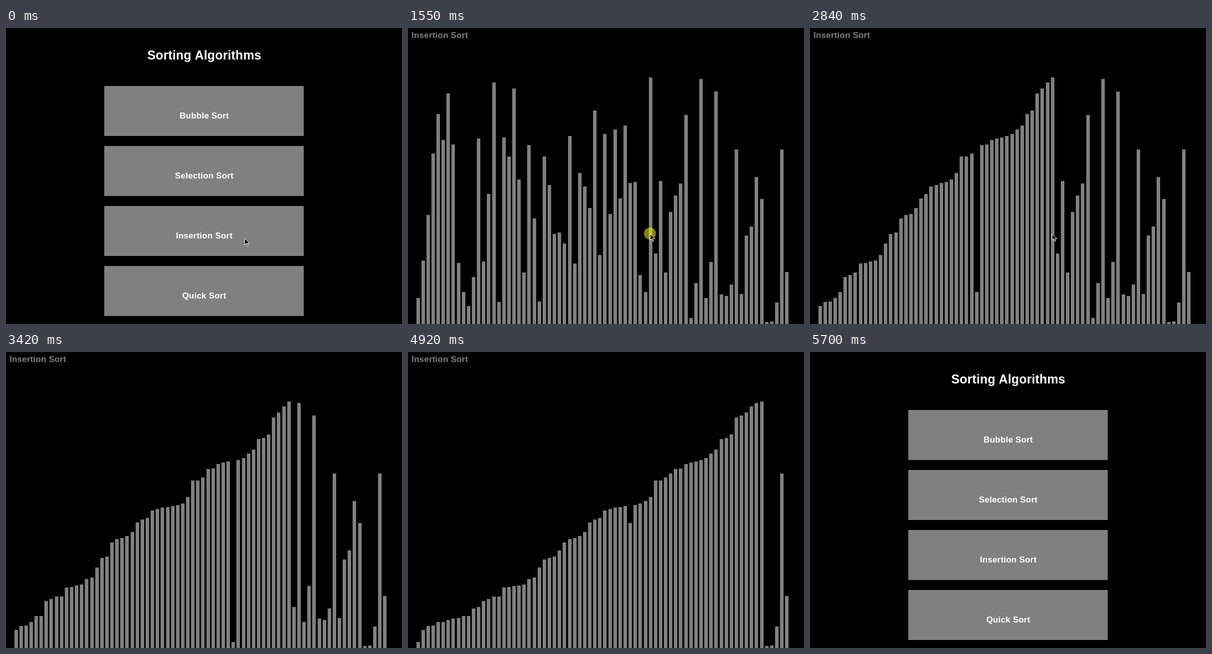
These frames come from a looping animation (794 px wide and 592 px high, 6.94 s). An HTML page with a canvas:

```html
<!DOCTYPE html>
<html lang="en">
<head>
<meta charset="utf-8">
<title>Sorting Algorithms</title>
<style>
html, body { margin: 0; width: 794px; height: 592px; overflow: hidden; background: #000; }
canvas { display: block; }
</style>
</head>
<body>
<canvas width="794" height="592"></canvas>
<script>
const ctx = document.querySelector('canvas').getContext('2d');
const LOOP = 6940, SORT_START = 1550, SORT_END = 5700;
const GRAY = '#808080';

// Top edge of each bar before sorting; the bars stand on the stage floor.
const tops = [
  540, 465, 374, 251, 172, 224, 131, 233, 470, 528, 556, 498, 221, 467, 332,
  109, 548, 219, 257, 121, 303, 489, 234, 381, 547, 257, 314, 412, 409, 431,
  216, 471, 290, 317, 360, 165, 454, 212, 372, 203, 341, 195, 310, 308, 494,
  528, 99, 451, 306, 489, 368, 335, 311, 174, 580, 510, 102, 540, 468, 127,
  533, 536, 513, 243, 532, 415, 397, 298, 342, 588, 587, 549, 243, 488];

// Cursor positions: [time, x, y]
const cursorPath = [
  [0, 478, 420], [240, 480, 417], [300, 482, 415],
  [550, 483, 414], [620, 484, 412], [680, 485, 411]];

// Screen updates come in runs of eleven ticks.
const runStarts = [1550, 2260, 2970, 3680, 4400, 5120];

// Record every swap of the insertion sort, and where each pass begins.
const swaps = [], passStart = [];
const swap = (a, j) => { [a[j - 1], a[j]] = [a[j], a[j - 1]]; };
const work = [...tops];
for (let i = 0; i < work.length; i++) {
  passStart.push(swaps.length);
  for (let j = i; j > 0 && work[j - 1] < work[j]; j--) {
    swap(work, j);
    swaps.push(j);
  }
}
passStart.push(swaps.length);

// Progress: [tick, pass, swaps done in that pass] as [tick, total swaps]
const progress = [[0, 0, 0], [12, 34, 4], [29, 54, 11], [39, 60, 50], [52, 68, 26], [64, 74, 0]]
  .map(([tick, pass, done]) => [tick, passStart[pass] + done]);

function tickAt(t) {
  const run = runStarts.findLastIndex(s => t >= s);
  return run * 11 + Math.min(10, Math.floor((t - runStarts[run] + 5) / 64.5));
}

function swapsAt(tick) {
  const n = progress.findIndex(p => p[0] > tick);
  if (n < 0) return swaps.length;
  const [k0, s0] = progress[n - 1], [k1, s1] = progress[n];
  return Math.round(s0 + (s1 - s0) * (tick - k0) / (k1 - k0));
}

function text(str, x, y, size, spacing, color, align) {
  ctx.font = `bold ${size}px "Liberation Sans", Arial, sans-serif`;
  ctx.letterSpacing = spacing + 'px';
  ctx.textAlign = align;
  ctx.fillStyle = color;
  ctx.fillText(str, x, y);
}

function drawCursor(x, y) {
  const outline = [[0, 0], [0, 13], [3, 10], [5, 15], [7, 15], [7, 14], [5, 10], [9.5, 10]];
  ctx.beginPath();
  for (const [dx, dy] of outline) ctx.lineTo(x + dx + 0.5, y + dy + 0.5);
  ctx.closePath();
  ctx.fillStyle = '#000';
  ctx.fill();
  ctx.strokeStyle = '#fff';
  ctx.lineWidth = 1;
  ctx.stroke();
}

function drawMenu() {
  text('Sorting Algorithms', 397.5, 63, 25, 0.12, '#fff', 'center');
  ['Bubble', 'Selection', 'Insertion', 'Quick'].forEach((name, i) => {
    const y = 116 + 120 * i;
    ctx.fillStyle = GRAY;
    ctx.fillRect(197, y, 400, 100);
    text(name + ' Sort', 397.5, y + 65, 17, 0.22, '#fff', 'center');
  });
}

function drawSort(tick) {
  const bars = [...tops];
  for (const j of swaps.slice(0, swapsAt(tick))) swap(bars, j);
  text('Insertion Sort', 7, 20, 17, 0.22, GRAY, 'left');
  bars.forEach((y, i) => ctx.fillRect(17 + Math.floor(i * 152 / 15), y, 7, 592 - y));
  if (tick < 2) {
    ctx.fillStyle = 'rgba(255, 255, 0, 0.5)';
    ctx.beginPath();
    ctx.arc(485, 411, 12, 0, 2 * Math.PI);
    ctx.fill();
  }
  if (tick < 26) drawCursor(485, 411);
}

function draw(now) {
  const t = now % LOOP;
  ctx.fillStyle = '#000';
  ctx.fillRect(0, 0, 794, 592);
  if (t >= SORT_START && t < SORT_END) {
    drawSort(tickAt(t));
  } else {
    drawMenu();
    if (t < SORT_START) {
      const [, x, y] = cursorPath.findLast(p => t >= p[0]);
      drawCursor(x, y);
    }
  }
}

let start;
function frame(now) {
  start ??= now;
  draw(now - start);
  requestAnimationFrame(frame);
}
requestAnimationFrame(frame);
</script>
</body>
</html>
```
